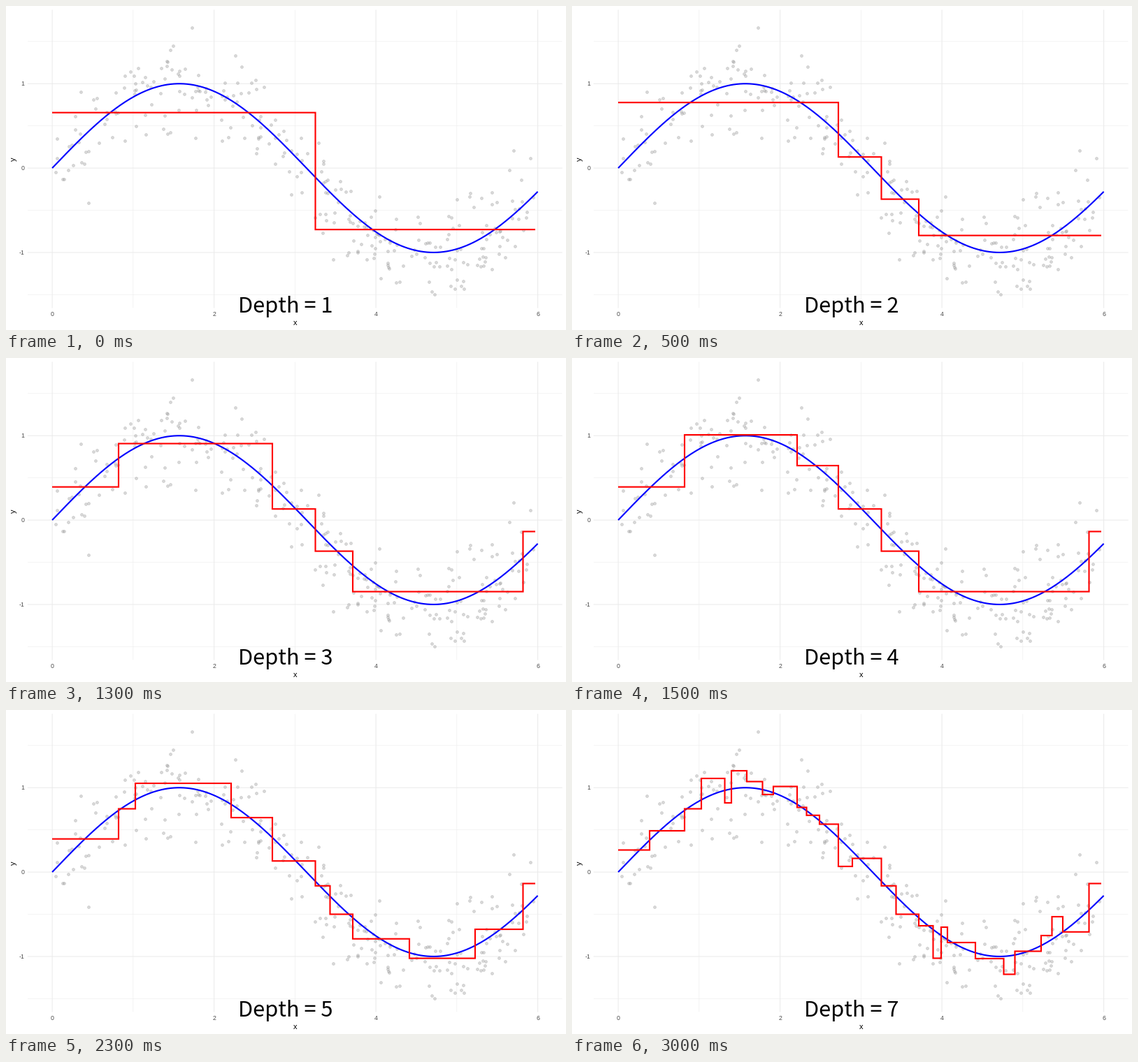
A matplotlib script for the animation above (3.5 s loop, 801x464 px).

```python
import numpy as np
import matplotlib.pyplot as plt
from matplotlib.animation import FuncAnimation

W, H, DPI = 801, 464, 64
PX = 72 / DPI  # points per pixel
LEFT, RIGHT, TOP, BOTTOM = 31.3, 795.2, 6, 432
X_START, X_END = 66, 757
SKEW = 1.15  # observations thin out towards x = 0


def to_x(x):
    return 66.1 + 115.75 * x


def to_y(y):
    return 232.1 - 120.85 * y


# Leaves of the full tree, one row per depth at which their left edge
# appears: (left edge, level) in pixels.
SPLITS = [
    [(X_START, 200.5), (442.5, 251.8)],
    [(381, 224), (496, 309)],
    [(161, 141.5), (739.5, 248.5)],
    [(322, 139.5)],
    [(185, 98), (463.5, 292.5), (577, 356), (671, 323)],
    [(111, 173), (218.5, 133), (228, 87), (272.5, 121), (516.5, 355.5),
     (528, 311)],
    [(250, 102.5), (288, 109.5), (335.5, 150.8), (354, 163.5), (401, 212.5),
     (537, 333), (617.5, 378.5), (633.5, 345.5), (686.5, 296), (702, 317.8)],
]
leaves = sorted((edge, level, depth)
                for depth, row in enumerate(SPLITS, 1) for edge, level in row)
EDGE, LEVEL, BORN = np.transpose(leaves)
MASS = np.diff(((np.r_[EDGE, X_END] - X_START) / (X_END - X_START)) ** SKEW)


def tree_steps(depth):
    """A shallow leaf takes the mean of the deeper leaves it contains."""
    kept = np.flatnonzero(BORN <= depth)
    levels = (np.add.reduceat(MASS * LEVEL, kept)
              / np.add.reduceat(MASS, kept))
    return np.r_[EDGE[kept], X_END], np.r_[levels, levels[-1]]


def draw_rule(ax, xs, ys, major):
    ax.plot(xs, ys, color="#ebebeb", lw=(1.07 if major else 0.53) * PX,
            snap=False, zorder=2 if major else 1)


def draw_grid(ax):
    for x in range(7):
        draw_rule(ax, [to_x(x)] * 2, [TOP, BOTTOM], x % 2 == 0)
    for y in np.arange(-1.5, 2, 0.5):
        draw_rule(ax, [LEFT, RIGHT], [to_y(y)] * 2, y % 1 == 0)


def draw_points(ax):
    rng = np.random.default_rng(7)
    x = 5.97 * rng.random(290) ** (1 / SKEW)
    y = np.clip(np.sin(x) + rng.normal(0, 0.3, x.size), -1.5, 1.72)
    ax.scatter(to_x(x), to_y(y), s=(3.9 * PX) ** 2, color="#999999",
               alpha=0.37, linewidths=0.8 * PX, zorder=3)


def draw_labels(ax):
    def label(x, y, text, size, color="black", **kw):
        ax.text(x, y, text, size=size * PX, color=color,
                family="Liberation Sans", **kw)

    for x in (0, 2, 4, 6):
        label(to_x(x), 444, str(x), 8.8, "#4d4d4d", ha="center")
    for y in (-1, 0, 1):
        label(26.6, to_y(y) + 3.2, str(y), 8.8, "#4d4d4d", ha="right")
    label(413.3, 457, "x", 11, ha="center")
    label(10.5, 219, "y", 11, ha="center", va="center", rotation=90)


fig = plt.figure(figsize=(W / DPI, H / DPI), dpi=DPI, facecolor="white")
ax = fig.add_axes([0, 0, 1, 1])
ax.set(xlim=(0, W), ylim=(H, 0))
ax.axis("off")

draw_grid(ax)
draw_points(ax)
draw_labels(ax)

line_style = dict(lw=2.13 * PX, solid_capstyle="butt", snap=False)
xs = np.linspace(0, 6, 300)
ax.plot(to_x(xs), to_y(np.sin(xs)), color="blue", zorder=4, **line_style)
tree, = ax.plot([], [], color="red", drawstyle="steps-post",
                solid_joinstyle="miter", zorder=5, **line_style)
caption = ax.text(399.5, 439, "", size=30.8 * PX, ha="center", va="baseline",
                  family="Noto Sans CJK JP", color="black", zorder=6)


def update(i):
    depth = i + 1
    tree.set_data(*tree_steps(depth))
    caption.set_text(f"Depth = {depth}")
    return tree, caption


anim = FuncAnimation(fig, update, frames=len(SPLITS), interval=500,
                     repeat=True, repeat_delay=0)
plt.show()
```
